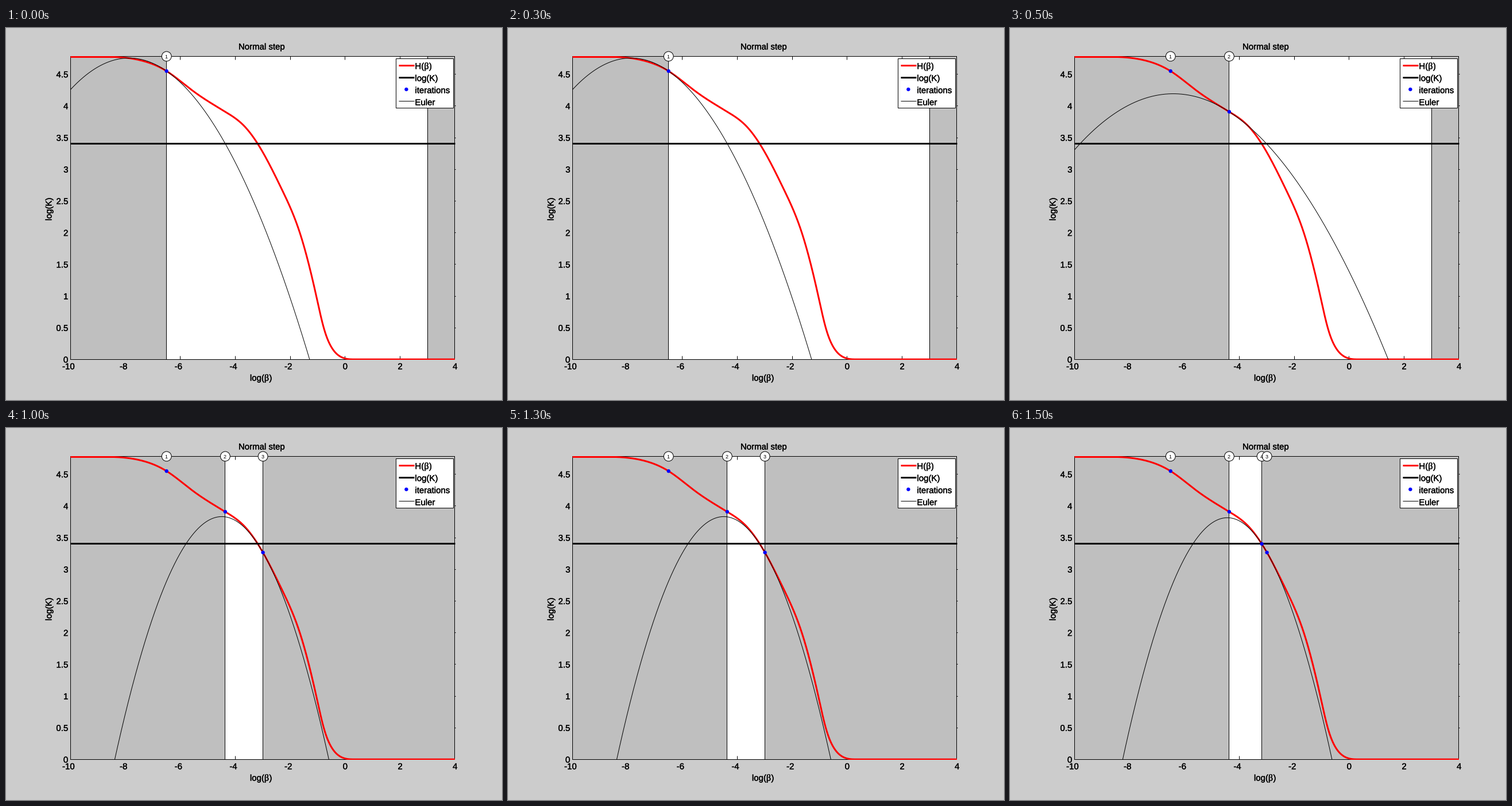
A matplotlib script that plays this animation: 864x648 px, repeating every 2000 ms.

```python
import numpy as np
import matplotlib.pyplot as plt
from matplotlib.animation import FuncAnimation
from matplotlib.patches import Circle, Rectangle
from matplotlib.patheffects import withStroke

W, H, DPI = 864, 648, 72
LEFT, RIGHT, TOP, BOTTOM = 112, 781, 49, 577
GRAY, BACK = "#bfbfbf", "#cccccc"
SIZE = 15
SHIFT = 0.4     # puts integers near pixel centres, still snapping to them

plt.rcParams["font.family"] = "Liberation Sans"

fig = plt.figure(figsize=(W / DPI, H / DPI), dpi=DPI, facecolor=BACK)
ax = fig.add_axes([0, 0, 1, 1])
ax.set_xlim(-SHIFT, W - SHIFT)
ax.set_ylim(H - SHIFT, -SHIFT)
ax.axis("off")

clip_box = Rectangle((LEFT - SHIFT, TOP - SHIFT), RIGHT - LEFT + 1,
                     BOTTOM - TOP + 1, transform=ax.transData)


def px(x):
    return LEFT + (x + 10) * 47.85


def py(y):
    return BOTTOM - y * 110.4


def line(xs, ys, color="black", width=1, z=5, clip=False):
    art, = ax.plot(xs, ys, color=color, lw=width, zorder=z,
                   solid_capstyle="butt")
    if clip:
        art.set_clip_path(clip_box)
    return art


def box(x0, y0, x1, y1, fill, z, edge="black"):
    return ax.add_patch(Rectangle((x0, y0), x1 - x0, y1 - y0, facecolor=fill,
                                  edgecolor=edge, lw=1, zorder=z))


def dot(x, y, z):
    return ax.add_patch(Circle((x, y), 3.2, color="blue", lw=0, zorder=z))


def label(x, y, text, ha="left", size=SIZE, bold=0.35, **kw):
    effects = [withStroke(linewidth=bold, foreground="black")] if bold else []
    return ax.text(x, y, text, ha=ha, va="baseline", fontsize=size,
                   zorder=15, path_effects=effects, **kw)


def beta_label(x, y, head, head_width):
    label(x, y, head)
    label(x + head_width, y, "β", family="Liberation Serif", size=16)
    label(x + head_width + 8.5, y, ")")


def spline(xk, yk):
    """Cubic spline through the knots, flat at and beyond both ends."""
    h = np.diff(xk)
    sec = np.diff(yk) / h
    n = len(xk)
    mat, rhs = np.eye(n), np.zeros(n)
    for i in range(1, n - 1):
        a, b = 1 / h[i - 1], 1 / h[i]
        mat[i, i - 1:i + 2] = a, 2 * (a + b), b
        rhs[i] = 3 * (sec[i - 1] * a + sec[i] * b)
    m = np.linalg.solve(mat, rhs)

    def curve(x):
        x = np.clip(x, xk[0], xk[-1])
        i = np.clip(np.searchsorted(xk, x, side="right") - 1, 0, n - 2)
        t = (x - xk[i]) / h[i]
        bend = (m[i] - sec[i]) * (1 - t) - (m[i + 1] - sec[i]) * t
        return yk[i] + h[i] * (sec[i] * t + t * (1 - t) * bend)

    return curve


# Plot area, frame and ticks
box(LEFT, TOP, RIGHT, BOTTOM, "white", 1)
for v in range(-8, 4, 2):
    x = round(px(v))
    line([x, x], [TOP, TOP + 6], z=2)
    line([x, x], [BOTTOM - 6, BOTTOM], z=2)
for v in np.arange(0.5, 5, 0.5):
    y = round(py(v))
    line([RIGHT, RIGHT + 2], [y, y], z=4)
box(LEFT, TOP, RIGHT, BOTTOM, "none", 4)

for v in range(-10, 5, 2):
    label(px(v) - (3.5 if v < 0 else 0), 594, str(v), "center")
for v in np.arange(0, 5, 0.5):
    label(108, py(v) + 5.5, f"{v:g}", "right")
label(445, 37, "Normal step", "center")
beta_label(424.5, 614, "log(", 25)
label(79, 315, "log(K)", "center", rotation=90, rotation_mode="anchor")

# Entropy curve and its goal
knots = np.array([
    (180, 50), (230, 55), (279.5, 74.8), (325, 109), (382, 145.8),
    (415, 170.8), (447.5, 217), (480, 280.5), (512, 358), (540, 466),
    (553, 521.5), (568, 558), (583, 572.5), (606, 576.8)])
entropy = spline(*knots.T)
xs = np.linspace(LEFT, RIGHT + 1, 1400)
line(xs, entropy(xs), "red", 3, 6, clip=True)
line([LEFT, RIGHT + 1], [201, 201], width=3, z=7)

# Legend
box(679, 53, 779, 139, "white", 10)
for y, color, width in ((65, "red", 3), (86, "black", 3), (127, "black", 1)):
    line([684, 711], [y, y], color, width, 11)
dot(697, 106.5, 11)
beta_label(712, 71, "H(", 16)
for k, text in enumerate(("log(K)", "iterations", "Euler")):
    label(712, 92 + 21 * k, text)

# Bracket shading with its edge lines
shade_left = box(LEFT, TOP, LEFT, BOTTOM, GRAY, 3)
shade_right = box(RIGHT, TOP, RIGHT, BOTTOM, GRAY, 3)
euler = line([], [], z=8, clip=True)

# Iterates, with the vertex and the lower root of each quadratic model
iterates = np.array([279.3, 381.5, 447.2, 438.2])
vertices = [213.8, 284, 375.5, 378.2]
roots = [528.5, 658.5, 562, 560.5]
solution = iterates[-1]

marks = []
for n, x in enumerate(iterates, 1):
    ring = ax.add_patch(Circle((x, TOP), 8.4, facecolor="white", lw=1,
                               edgecolor="black", zorder=13 - n / 10))
    digit = label(x - 0.5, 52.3, str(n), "center", 9, bold=0)
    marks.append((dot(x, entropy(x), 9), ring, digit))


def model(x, i):
    """Parabola through the iterate and the lower root."""
    def rise(u):
        return (u - vertices[i]) ** 2 - (iterates[i] - vertices[i]) ** 2

    y0 = entropy(iterates[i])
    return y0 + (BOTTOM - y0) * rise(x) / rise(roots[i])


def draw(i):
    seen = iterates[:i + 1]
    low = int(max(seen[seen < solution]))
    high = int(min(seen[seen >= solution], default=px(3)))
    shade_left.set_width(low - LEFT)
    shade_right.set_x(high)
    shade_right.set_width(RIGHT - high)
    euler.set_data(xs, model(xs, i))
    for n, group in enumerate(marks):
        for art in group:
            art.set_visible(n <= i)
    return []


anim = FuncAnimation(fig, draw, frames=len(iterates), interval=500,
                     repeat=True, repeat_delay=0, blit=False)
plt.show()
```
